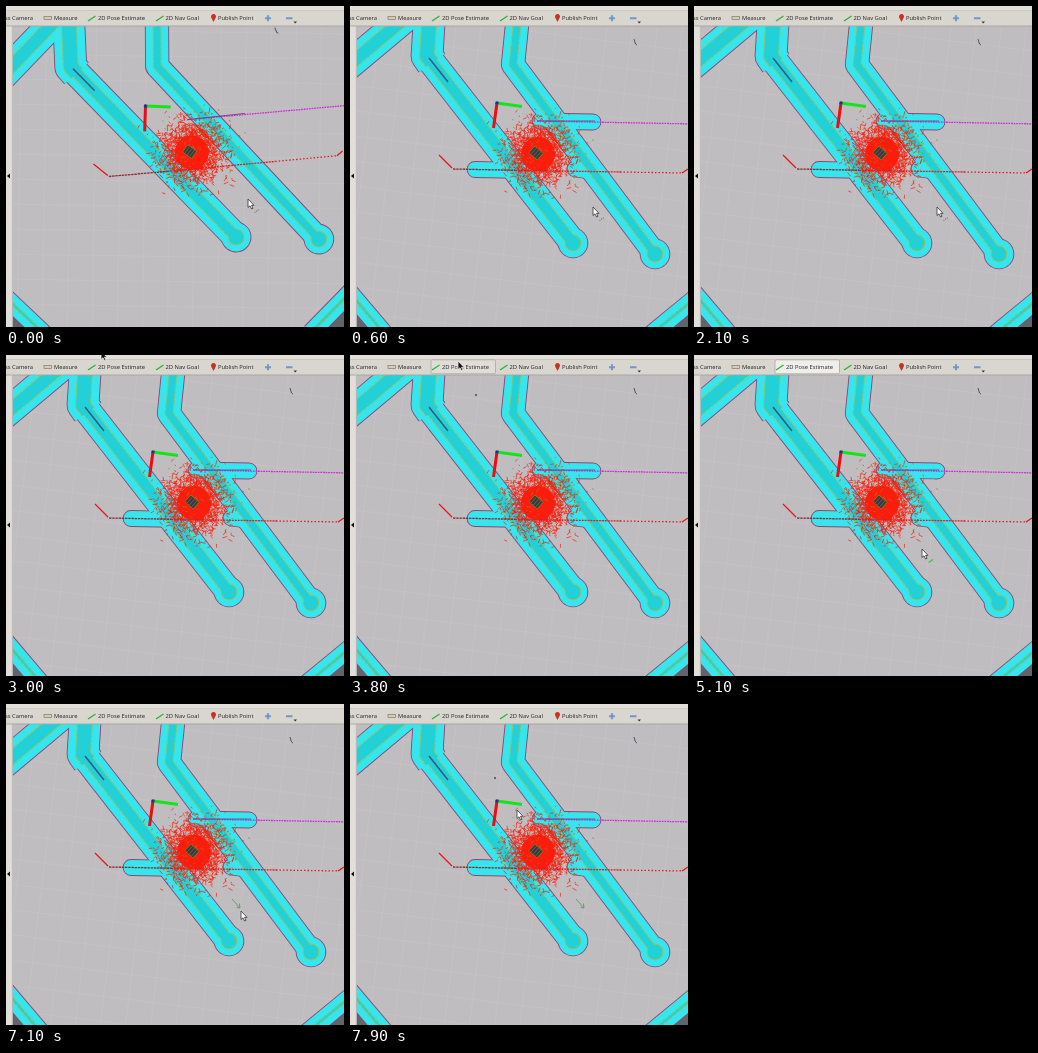
An HTML page that plays this animation: 338 px wide and 321 px high, repeating every 8000 ms.

```html
<!DOCTYPE html>
<html lang="en">
<head>
<meta charset="utf-8">
<title>Pose estimate</title>
<style>
  html, body { margin: 0; width: 100%; height: 100%; overflow: hidden; background: #c0bdc0; }
  svg { display: block; width: 338px; height: 321px; }
  text { font: 500 5.8px "Open Sans", "Noto Sans", sans-serif; fill: #222; }
</style>
</head>
<body>
<svg viewBox="0 0 338 321">
  <defs><clipPath id="view"><rect x="6.5" y="20" width="332" height="301"/></clipPath></defs>
  <rect width="338" height="321" fill="#c0bdc0"/>
  <g clip-path="url(#view)">
    <g id="world" fill="none">
      <path id="grid" stroke="#c6c4c7" stroke-width=".6"/>
      <path d="M-17 267L64 363H-60ZM259 363L380 264V363Z" fill="#60656a"/>
      <g id="costmap"></g>
      <path d="M79 52L98 76" stroke="#275a80" stroke-width="1.4"/>
      <path d="M79 52L98 76" stroke="#8c3d62" stroke-width=".7" stroke-dasharray="2 3"/>
      <path d="M284 33L285.5 38L287 39" stroke="#55555c"/>
      <path id="specks" stroke="#8f8a35" stroke-width=".9"/>
      <path id="cloud" stroke="#fb1d0c" stroke-width=".7"/>
      <circle cx="188" cy="148" r="17" fill="#fb1d0c"/>
      <path id="gaps" stroke="#c9652f" stroke-width=".7"/>
      <path d="M187 115L345 118" stroke="#d02bdc" stroke-width="1.3" stroke-dasharray="1.8 .8"/>
      <path d="M187 115H245" stroke="#73396c" stroke-width=".8"/>
      <path d="M103 163L165 164.3" stroke="#8e2a30" stroke-width="1.3" stroke-dasharray="2.5 .7"/>
      <path d="M165 164.3L270 166" stroke="#d7202a" stroke-width="1.3" stroke-dasharray="2 .9"/>
      <path d="M270 166L333 167" stroke="#e01820" stroke-width="1.3" stroke-dasharray="1.5 2"/>
      <path d="M89 149L102 162M332 167L338 163" stroke="#e5141c" stroke-width="1.3"/>
      <g stroke-width="3">
        <path d="M147 97L143.5 122" stroke="#e90e12"/>
        <path d="M147 97L172 100.5" stroke="#14e51b"/>
      </g>
      <circle cx="147" cy="97" r="1.8" fill="#27308e"/>
      <g transform="translate(186 147) rotate(42)">
        <rect x="-5.5" y="-4.5" width="11" height="9" fill="#3c3d3a" stroke="#8a7a22" stroke-width=".8"/>
        <path d="M-3 -4V4M0 -4V4M3 -4V4" stroke="#6d706b" stroke-width=".6"/>
      </g>
    </g>
    <path id="goal" d="M0 -2.5H47V-6L63 0L47 6V2.5H0Z" fill="#12e814"/>
    <path id="trace" d="M226 195L234 204M230.5 203.5L234 204L233.5 199.5" fill="none" stroke="#5f9a62" stroke-width=".9"/>
  </g>

  <path d="M0 0H338V20H6.5V321H0Z" fill="#e2dfda"/>
  <path d="M0 4.5H338V20H0Z" fill="#d9d5cf"/>
  <path d="M0 4.5H338" stroke="#c9c5bf" stroke-width=".8"/>
  <path d="M0 20H338" stroke="#a5a29f" stroke-width=".9"/>
  <path d="M6.3 20V321" stroke="#b4b2b0" stroke-width=".7"/>
  <path d="M4 167.5V172.5L1 170Z" fill="#111"/>
  <rect id="button" x="81" y="4.8" width="64.5" height="14" rx="1.5" stroke="#aaa7a2" stroke-width=".8"/>
  <text x="-1" y="14">ss Camera</text>
  <text x="48" y="14">Measure</text>
  <text x="92" y="14">2D Pose Estimate</text>
  <text x="159.5" y="14">2D Nav Goal</text>
  <text x="212" y="14">Publish Point</text>
  <rect x="38" y="10.5" width="7.5" height="3" fill="#d8cdb8" stroke="#85796a" stroke-width=".7"/>
  <path d="M82 15L89.5 10M150 15L157.5 10" stroke="#35b53b" stroke-width="1.5"/>
  <path d="M207.5 16L205.3 11.8A2.5 2.5 0 1 1 209.7 11.8Z" fill="#c63325"/>
  <path d="M259 12.3H265M262 9.3V15.3M280 12.3H286.5" stroke="#7397c6" stroke-width="2"/>
  <path d="M287.5 15.5H291L289.2 17.5Z" fill="#333"/>

  <circle id="dot" r="1.2" fill="#111" stroke="#eee" stroke-width=".5"/>
  <g id="cursor">
    <path id="pointer" d="M0 -4V4.5L2 2.8L3.6 6L5 5.3L3.5 2.3H6Z" stroke-width=".8"/>
    <path id="badge" d="M6.5 9.5L11 6.5" stroke-width="1.3"/>
  </g>
</svg>
<script>
const $ = id => document.getElementById(id);
const LOOP = 8000, STEP = 100;

let seed = 11;
const random = () => (seed = (seed * 16807) % 2147483647) / 2147483647;
const normal = () => random() + random() + random() + random() - 2;
const lerp = (a, b, k) => a + (b - a) * k;
const clamp = k => Math.max(0, Math.min(1, k));

// Inflated walls: path, outer width, distance between the wall lines
const corridors = [
  ['M-10 66.5L79 -8', 28, 13],
  ['M82 -30L77 50L82 57', 31, 15],
  ['M77 50L223 237', 26, 11],
  ['M171 -20L163 58.5L305 248', 22.5, 8],
  ['M-17 267L50 346', 17, 3],
  ['M287 340L357 282.5', 17, 3]
];
const ends = [[223, 237], [305, 248]];
const lobes = 'M125 163.5L165 164.3M190 115L243 116M225 163L248 166';

function layer(color, widthOf, radius, lobeWidth, dash = '') {
  const paths = corridors.map(c =>
    `<path d="${c[0]}" stroke-width="${widthOf(c)}" stroke-dasharray="${dash}"/>`).join('');
  const caps = ends.map(([x, y]) =>
    `<circle cx="${x}" cy="${y}" r="${radius}" fill="${color}" stroke="none"/>`).join('');
  const bumps = lobeWidth
    ? `<path class="lobe" d="${lobes}" stroke-width="${lobeWidth}" stroke-linecap="round"/>` : '';
  return `<g stroke="${color}" stroke-linejoin="round">${paths}${caps}${bumps}</g>`;
}

$('costmap').innerHTML =
  layer('#93426f', c => c[1] + 1.8, 15.3, 16.8) +
  layer('#35e6ee', c => c[1], 14.4, 15) +
  layer('#8cc36a', c => c[2] + 1, 8.4, 0, '4 1') +
  layer('#22d0d8', c => c[2] - 1.2, 7.3, 0);
const lobeNodes = document.querySelectorAll('.lobe');

function buildGrid() {
  const angle = 7 * Math.PI / 180, c = Math.cos(angle), s = Math.sin(angle);
  const at = (u, v) => `${147 + u * c - v * s} ${97 + u * s + v * c}`;
  let d = '';
  for (let k = -12; k <= 14; k++) {
    d += `M${at(k * 25, -400)}L${at(k * 25, 400)}M${at(-400, k * 25)}L${at(400, k * 25)}`;
  }
  $('grid').setAttribute('d', d);
}

function scatter(id, count, cx, cy, spread, length) {
  let d = '';
  for (let i = 0; i < count; i++) {
    const x = cx + normal() * spread, y = cy + normal() * spread;
    const a = random() * Math.PI * 2, r = length * (.4 + random());
    d += `M${x.toFixed(1)} ${y.toFixed(1)}l${(Math.cos(a) * r).toFixed(1)} ${(Math.sin(a) * r).toFixed(1)}`;
  }
  $(id).setAttribute('d', d);
}

buildGrid();
scatter('specks', 170, 200, 138, 30, 1.5);
scatter('cloud', 1500, 188, 148, 27, 3.8);
scatter('gaps', 45, 188, 148, 22, 2);

// Pointer keys: time, x, y
const keys = [
  [0, 242, 197], [500, 243, 205], [2700, 243, 205], [3000, 95, 0], [3400, 108, 10],
  [3800, 108, 10], [3900, 126, 40], [4500, 228, 198], [5500, 228, 198], [6200, 235, 211],
  [7700, 235, 211], [7900, 167, 110], [8000, 145, 74]
];

function pointerAt(t) {
  const i = Math.max(1, keys.findIndex(k => k[0] >= t));
  const [t0, x0, y0] = keys[i - 1], [t1, x1, y1] = keys[i];
  const k = (t - t0) / (t1 - t0);
  return [lerp(x0, x1, k), lerp(y0, y1, k)];
}

const show = (node, on) => node.setAttribute('visibility', on ? 'visible' : 'hidden');

function render(t) {
  const turn = lerp(-6.2, 0, clamp(t / 500));
  $('world').setAttribute('transform', `rotate(${turn} 172 168)`);
  lobeNodes.forEach(node => show(node, t >= 400));

  const selected = t >= 3900 && t < 7100;
  show($('button'), t >= 3700 && t < 7100);
  $('button').setAttribute('fill', selected ? '#f0eeea' : '#e0ddd8');
  show($('goal'), t >= 5600 && t < 7100);
  const heading = lerp(52, 66.7, clamp((t - 5600) / 600));
  $('goal').setAttribute('transform', `translate(227 194) rotate(${heading})`);
  show($('trace'), t >= 7100);

  const [x, y] = pointerAt(t), [nx, ny] = pointerAt(Math.min(LOOP, t + STEP));
  $('cursor').setAttribute('transform', `translate(${x} ${y})`);
  const overBar = y < 20;
  $('pointer').setAttribute('fill', overBar ? '#111' : '#fff');
  $('pointer').setAttribute('stroke', overBar ? '#eee' : '#333');
  show($('badge'), !overBar && t < 7100);
  $('badge').setAttribute('stroke', selected ? '#45c24a' : '#77777c');
  $('badge').setAttribute('stroke-dasharray', selected ? '' : '1 1');

  show($('dot'), ny > 20 && Math.hypot(nx - x, ny - y) > 20);
  $('dot').setAttribute('cx', nx);
  $('dot').setAttribute('cy', ny);
}

const start = performance.now();
function tick() {
  const t = (performance.now() - start) % LOOP;
  render(Math.floor(t / STEP) * STEP);
  requestAnimationFrame(tick);
}
tick();
</script>
</body>
</html>
```
